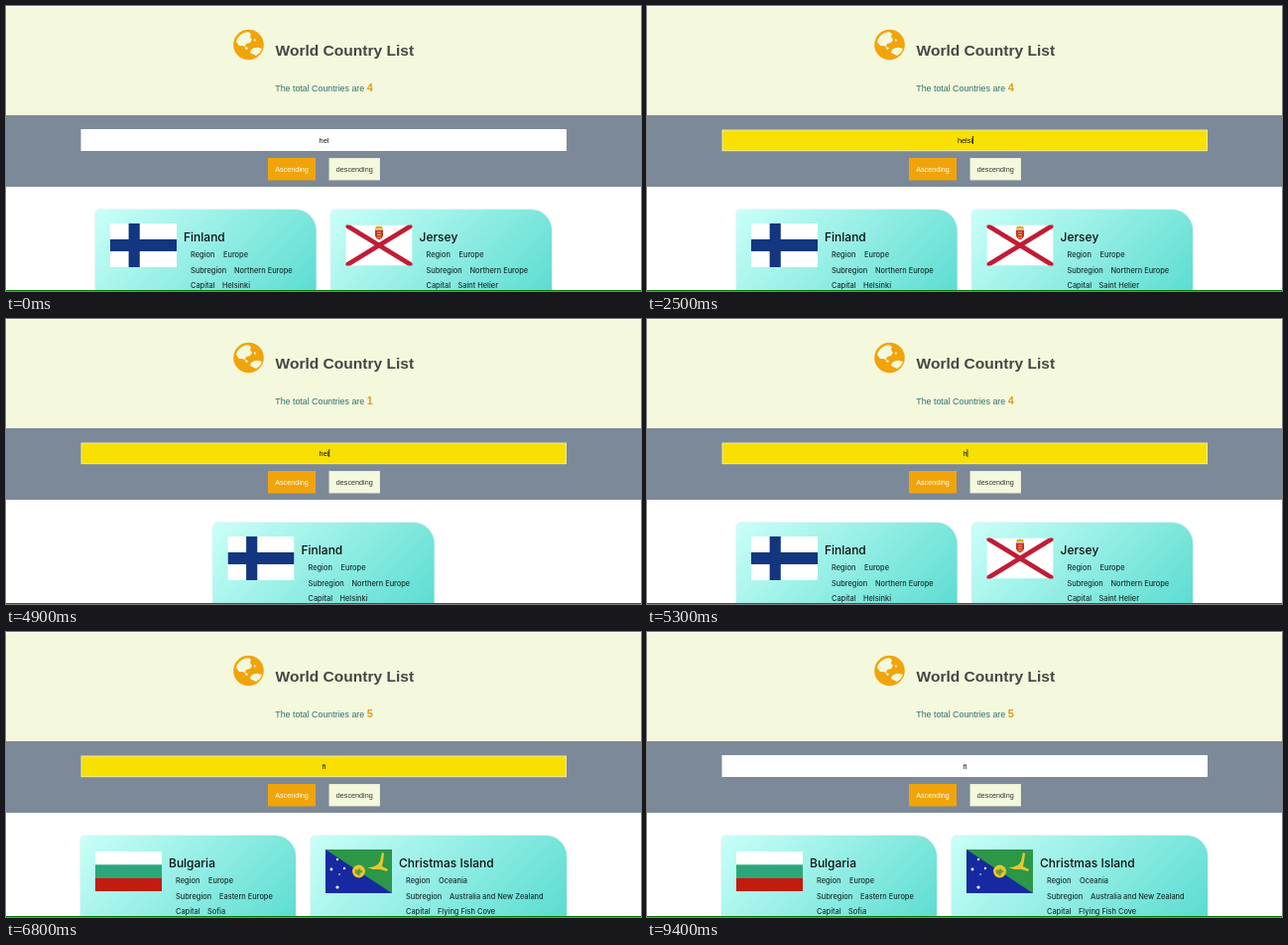
Animation, 640 px wide and 287 px high, one loop 9.5 s. Source, as an HTML page with a canvas:

```html
<!DOCTYPE html>
<html lang="en">
<head>
<meta charset="utf-8">
<title>World Country List</title>
<style>
  html, body { margin: 0; width: 100%; height: 100%; overflow: hidden; background: #fff; }
  canvas { display: block; width: 640px; height: 287px; }
</style>
</head>
<body>
<canvas id="stage"></canvas>
<script>
const W = 640, H = 287, LOOP = 9500;
const SANS = '"Liberation Sans", Arial, sans-serif';
const CARD_FONT = 'Inter, sans-serif';
const CREAM = '#f4f8dc', ORANGE = '#f1a409', SLATE = '#7c8999';
const HINT = 'Search ex) name of (country, region, subregion, languages, capital), number of (population), symbol of(currency)';

const canvas = document.getElementById('stage');
const ctx = canvas.getContext('2d');
const ratio = window.devicePixelRatio || 1;
canvas.width = W * ratio;
canvas.height = H * ratio;
ctx.scale(ratio, ratio);

function rect(x, y, w, h, color) {
  ctx.fillStyle = color;
  ctx.fillRect(x, y, w, h);
}
function disc(x, y, r, color) {
  ctx.fillStyle = color;
  ctx.beginPath();
  ctx.arc(x, y, r, 0, Math.PI * 2);
  ctx.fill();
}
function shape(path, color) {
  ctx.fillStyle = color;
  ctx.fill(new Path2D(path));
}
function line(x1, y1, x2, y2, color, width) {
  ctx.strokeStyle = color;
  ctx.lineWidth = width;
  ctx.beginPath();
  ctx.moveTo(x1, y1);
  ctx.lineTo(x2, y2);
  ctx.stroke();
}
function text(value, x, y, font, color, align = 'left') {
  ctx.font = font;
  ctx.fillStyle = color;
  ctx.textAlign = align;
  ctx.fillText(value, x, y);
}
function textWidth(value, font) {
  ctx.font = font;
  return ctx.measureText(value).width;
}

// Each flag paints itself into a w by h box at the origin.
const flags = {
  finland(w, h) {
    rect(0, 0, w, h, '#fff');
    rect(0, h * 4 / 11, w, h * 3 / 11, '#12367f');
    rect(w * 5 / 18, 0, w * 3 / 18, h, '#12367f');
  },
  jersey(w, h) {
    rect(0, 0, w, h, '#fff');
    line(0, 0, w, h, '#c01d35', 4.6);
    line(0, h, w, 0, '#c01d35', 4.6);
    shape('M29.5 5h8v6q-1 3-4 4q-3-1-4-4z', '#c8312b');
    shape('M29.5 4l1-3 2 1 1-2 1 2 2-1 1 3z', '#dba72c');
    for (const y of [7, 9.5, 12]) rect(31.5, y, 4, 1, '#e2b444');
  },
  afghanistan(w, h) {
    ['#060606', '#ad180c', '#2fb00c'].forEach((c, i) => rect(i * w / 3, 0, w / 3 + .1, h, c));
    ctx.strokeStyle = '#e0b0a8';
    ctx.lineWidth = 1.3;
    ctx.beginPath();
    ctx.arc(w / 2, h / 2, 8.5, -.9, Math.PI + .9);
    ctx.stroke();
    shape('M29 25v-4q4.500-4 9 0v4zM30 17q3.500-3 7 0l-1 1h-5zM29 26h9v1.500h-9z', '#e4bcb4');
    rect(32.5, 22, 2, 3, '#ad180c');
  },
  albania(w, h) {
    rect(0, 0, w, h, '#d01d1c');
    ctx.save();
    ctx.translate(w / 2, h / 2);
    for (const side of [1, -1]) {
      ctx.save();
      ctx.scale(side, 1);
      shape('M0-8Q1-13 5-13L7-11 4-10 3-7 4-5 10-10 11-13 13-6 11-6 12-3 9-3 10 0 7-1 8 3 5 2 7 7 11 9 5 9 3 8 2 12 0 15z', '#2a0c0b');
      ctx.restore();
    }
    ctx.restore();
  },
  bulgaria(w, h) {
    ['#fff', '#2ca77b', '#c01d0f'].forEach((c, i) => rect(0, i * h / 3, w, h / 3 + .1, c));
  },
  christmas(w, h) {
    rect(0, 0, w, h, '#1729a0');
    shape(`M0 0H${w}V${h}z`, '#2b9747');
    disc(w / 2, h / 2, 6.5, '#e9c62f');
    shape('M30 20l2 1 2-2 2 2 2 1-3 2-1 3-2-2-2-1z', '#6b9b35');
    shape('M42 18Q52 18 55 12L57 3 59 4 58 12 57 17 63 20 62 22 55 20 48 20z', '#e9c62f');
    for (const [x, y, r] of [[12, 10, 1.2], [6, 20, 1.4], [19, 19, 1.2], [14, 25, .8], [12, 38, 1.6]])
      disc(x, y, r, '#fff');
  },
  niue(w, h) {
    const cw = w / 2, ch = h / 2;
    rect(0, 0, w, h, '#f6d81d');
    ctx.save();
    ctx.beginPath();
    ctx.rect(0, 0, cw, ch);
    ctx.clip();
    rect(0, 0, cw, ch, '#233578');
    for (const [color, width] of [['#fff', 3.4], ['#c8283a', 1.2]]) {
      line(0, 0, cw, ch, color, width);
      line(0, ch, cw, 0, color, width);
    }
    for (const [color, width] of [['#fff', 5.4], ['#c8283a', 3]]) {
      line(cw / 2, 0, cw / 2, ch, color, width);
      line(0, ch / 2, cw, ch / 2, color, width);
    }
    disc(cw / 2, ch / 2, 2.4, '#233578');
    disc(cw / 2, ch / 2, 1.2, '#f6d81d');
    ctx.restore();
  }
};

const country = (name, flag, flagH, region, subregion, capital) =>
  ({ name, flag, flagH, facts: { Region: region, Subregion: subregion, Capital: capital } });
const finland = country('Finland', 'finland', 44, 'Europe', 'Northern Europe', 'Helsinki');
const jersey = country('Jersey', 'jersey', 41, 'Europe', 'Northern Europe', 'Saint Helier');
const afghanistan = country('Afghanistan', 'afghanistan', 44, 'Asia', 'Southern Asia', 'Kabul');
const albania = country('Albania', 'albania', 44, 'Europe', 'Southern Europe', 'Tirana');
const bulgaria = country('Bulgaria', 'bulgaria', 40, 'Europe', 'Eastern Europe', 'Sofia');
const christmas = country('Christmas Island', 'christmas', 44, 'Oceania', 'Australia and New Zealand', 'Flying Fish Cove');
const niue = country('Niue', 'niue', 34, 'Oceania', 'Polynesia', 'Alofi');

// Result pages: total, then [country, left, right] for each visible card.
const pages = {
  hel: { total: 4, cards: [[finland, 90, 312.5], [jersey, 327.5, 550]] },
  helsinki: { total: 1, cards: [[finland, 208.5, 431.5]] },
  all: { total: 250, cards: [[afghanistan, 95, 306.5], [albania, 322, 545]] },
  fiUp: { total: 5, cards: [[bulgaria, 75, 292], [christmas, 307, 565]] },
  fiDown: { total: 5, cards: [[niue, 103, 299], [finland, 314.5, 537]] }
};

const typed = [
  [0, 'hel'], [2000, 'hels'], [2400, 'helsi'], [2700, 'helsin'], [2900, 'helsink'], [3100, 'helsinki'],
  [4200, 'helsink'], [4350, 'helsin'], [4500, 'helsi'], [4650, 'hels'], [4800, 'hel'],
  [5000, 'he'], [5200, 'h'], [5450, ''], [6100, 'f'], [6300, 'fi']
];
const results = [
  [0, 'hel'], [2600, 'helsinki'], [4950, 'hel'], [5500, 'all'],
  [6500, 'fiUp'], [7400, 'fiDown'], [8600, 'fiUp']
];
const focus = [1000, 7100];
const latest = (track, t) => track.findLast(step => step[0] <= t);

function drawGlobe() {
  disc(244.5, 39, 15.3, ORANGE);
  shape('M233 33Q237 26.500 244 26L247 28 246 31 248 34 246 37 242 38 241 41 238 40 235 40 232 36z', CREAM);
  shape('M247 44Q251 41 255 42L258 43 256 47 252 50 248 48 246 47z', CREAM);
  shape('M241 41l3 1-1 2-2-1zM250 33l2 1-1 2-1-1z', CREAM);
}

function drawHeader(total) {
  rect(0, 1, W, 109, CREAM);
  drawGlobe();
  text('World Country List', 271.5, 50.2, `bold 15.55px ${SANS}`, '#464646');
  const label = 'The total Countries are', labelFont = `8.85px ${SANS}`, totalFont = `bold 10.9px ${SANS}`;
  const labelW = textWidth(label, labelFont), gap = 2.5;
  const x = 320.5 - (labelW + gap + textWidth(total, totalFont)) / 2;
  text(label, x, 86, labelFont, '#2f7272');
  text(total, x + labelW + gap, 86, totalFont, '#e39b18');
}

function drawSearch(t) {
  const [since, value] = latest(typed, t);
  const focused = t >= focus[0] && t < focus[1];
  const font = `7.33px ${SANS}`;
  rect(0, 110, W, 72, SLATE);
  if (focused) {
    rect(75.5, 124.5, 489.5, 21.7, '#efeaa0');
    rect(76.5, 125.5, 487.5, 19.7, '#f7e002');
  } else {
    rect(75.5, 124, 489.5, 22, '#fff');
  }
  text(value || HINT, 320.5, 137.5, font, value ? '#111' : '#77702a', 'center');
  const elapsed = t - Math.max(since, focus[0]);
  if (focused && elapsed % 1000 < 500)
    rect(320.5 + textWidth(value, font) / 2, 131, .8, 8, '#111');
}

function drawButton(label, x, w, active) {
  rect(x, 153, w, 22.5, active ? ORANGE : '#e3e7d0');
  if (!active) rect(x + .6, 153.6, w - 1.2, 21.3, CREAM);
  text(label, x + w / 2, 166.8, `7.2px ${SANS}`, active ? '#fff' : '#333', 'center');
}

function drawCard([item, left, right]) {
  const w = right - left, h = 140, top = 205, flagX = left + 15, textX = left + 89;
  const cx = left + w / 2, cy = top + h / 2, reach = (w + h) / 4;
  const fill = ctx.createLinearGradient(cx - reach, cy - reach, cx + reach, cy + reach);
  fill.addColorStop(0, '#cafff8');
  fill.addColorStop(1, '#48d6ca');
  ctx.save();
  ctx.shadowColor = 'rgba(90, 150, 145, .35)';
  ctx.shadowBlur = 2 * ratio;
  ctx.fillStyle = fill;
  ctx.beginPath();
  ctx.roundRect(left, top, w, h, [5, 21, 5, 21]);
  ctx.fill();
  ctx.restore();

  ctx.save();
  ctx.translate(flagX, 241 - item.flagH / 2);
  ctx.beginPath();
  ctx.rect(0, 0, 67, item.flagH);
  ctx.clip();
  flags[item.flag](67, item.flagH);
  ctx.restore();

  text(item.name, textX, 236.7, `500 12px ${CARD_FONT}`, '#111');
  const font = `500 7.4px ${CARD_FONT}`, offsets = [33, 44, 32];
  Object.entries(item.facts).forEach(([label, value], i) => {
    const y = 253 + i * 15.5;
    text(label, textX + 7, y, font, '#17302e');
    text(value, textX + 7 + offsets[i], y, font, '#17302e');
  });
}

function draw(t) {
  const key = latest(results, t)[1], page = pages[key];
  rect(0, 0, W, H, '#fff');
  drawHeader(String(page.total));
  drawSearch(t);
  drawButton('Ascending', 264, 48, key !== 'fiDown');
  drawButton('descending', 325.5, 51.5, key === 'fiDown');
  page.cards.forEach(drawCard);
  rect(0, 286, W, 1, '#087a08');
}

function tick() {
  draw(performance.now() % LOOP);
  requestAnimationFrame(tick);
}
tick();
</script>
</body>
</html>
```
